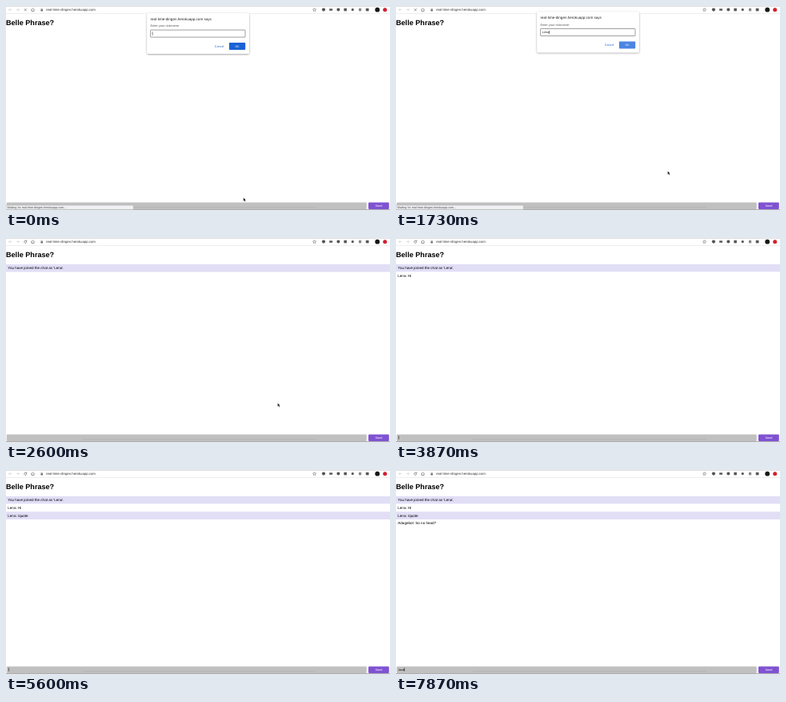
Write an HTML page that moves like this. It is 480 by 256 pixels and loops after 8000 ms.

```html
<!DOCTYPE html>
<html lang="en">
<head>
<meta charset="utf-8">
<title>Chat</title>
<style>
html, body { margin: 0; width: 100%; height: 100%; overflow: hidden; background: #fff; }
svg { display: block; width: 480px; height: 256px; }
text { font: 4.55px "Liberation Sans", Arial, sans-serif; text-rendering: geometricPrecision; white-space: pre; }
.line { fill: none; stroke: #555; stroke-width: .6; }
.idle { stroke: #c4c6c9; }
</style>
</head>
<body>
<svg viewBox="0 0 480 256">
  <defs>
    <filter id="shadow" x="-10%" y="-10%" width="120%" height="130%">
      <feDropShadow dx="0" dy=".8" stdDeviation="1.3" flood-opacity=".4"/>
    </filter>
  </defs>
  <rect width="480" height="256" fill="#fff"/>

  <!-- browser toolbar -->
  <rect width="480" height=".8" fill="#d5d7db"/>
  <rect y="9" width="480" height=".5" fill="#dcdde0"/>
  <path class="line idle" d="M7 4.7H3.6m1.5-1.5-1.5 1.5 1.5 1.5M13 4.7h3.4m-1.5-1.5 1.5 1.5-1.5 1.5"/>
  <path class="line" id="stop" d="m22.9 3.3 2.8 2.8m0-2.8-2.8 2.8"/>
  <path class="line" id="reload" d="M25.6 3.7a1.6 1.6 0 1 0 .3 1.5m0-2.3v1.3h-1.3"/>
  <path class="line" d="m31.4 4.8 2.1-1.9 2.1 1.9m-3.6-.4v2.2h3v-2.2"/>
  <path d="M43.5 4.4h2.4v2h-2.4z" fill="#555"/>
  <path class="line" style="stroke-width:.4" d="M44 4.4v-.8a.7.7 0 0 1 1.4 0v.8"/>
  <text x="50" y="6.2" style="font-size:4.31px" fill="#333">real-time-dingen.herokuapp.com</text>
  <path class="line" style="stroke-width:.45" d="m385.6 2.6.6 1.4 1.5.1-1.2 1 .4 1.5-1.3-.8-1.3.8.4-1.5-1.2-1 1.5-.1z"/>
  <g fill="#555">
    <circle cx="397" cy="4.6" r="2.1"/>
    <rect x="404.2" y="3.4" width="3.9" height="2.4"/>
    <circle cx="415.4" cy="4.6" r="2"/>
    <rect x="422.4" y="2.9" width="3.5" height="3.5"/>
    <circle cx="433.3" cy="4.6" r="1.6"/>
    <rect x="441" y="3" width="3.2" height="3.4" fill="#888"/>
    <rect x="449.8" y="3" width="3.7" height="3.4"/>
  </g>
  <circle cx="464.2" cy="4.7" r="2.9" fill="#171914"/>
  <circle cx="473.7" cy="4.7" r="2.5" fill="#d3202f"/>

  <!-- page -->
  <text x="0" y="24.4" style="font-size:9.1px;font-weight:bold">Belle Phrase?</text>
  <g id="chat"></g>
  <rect x=".8" y="246.4" width="449.9" height="8.6" rx="1" fill="#c0c0c0"/>
  <rect x="453" y="246.4" width="25.8" height="8.6" rx="1.2" fill="#8052d2"/>
  <text x="465.9" y="251.9" style="font-size:3.79px" fill="#fff" text-anchor="middle">Send</text>
  <rect x="96" y="252.3" width="292" height=".8" fill="#aaa" opacity=".6"/>
  <rect y="255.2" width="480" height=".8" fill="#999"/>
  <text id="entry" x="3" y="251.8" style="font-size:3.79px"></text>
  <rect id="entryCaret" y="248.2" width=".5" height="4.4"/>
  <g id="status">
    <path d="M0 250.1h158.3q1 0 1 1v4.3H0z" fill="#f0f1f3" stroke="#a9abae" stroke-width=".5"/>
    <text x="1.4" y="254" style="font-size:3.65px" fill="#444">Waiting for real-time-dingen.herokuapp.com...</text>
  </g>

  <!-- prompt -->
  <g id="dialog">
    <rect x="176.2" y="8.9" width="127.8" height="51" rx="1.8" fill="#fff" filter="url(#shadow)"/>
    <text x="180.5" y="18.1" style="font-size:4.57px" fill="#222">real-time-dingen.herokuapp.com says</text>
    <text x="180.5" y="26.3" style="font-size:3.86px" fill="#555">Enter your nickname:</text>
    <rect x="180.6" y="30.1" width="118.4" height="9" rx=".5" fill="#fff" stroke="#777" stroke-width=".7"/>
    <text id="nick" x="182.8" y="35.9" style="font-size:3.75px" fill="#222"></text>
    <rect id="nickCaret" y="32.4" width=".5" height="4.4"/>
    <text x="266.6" y="51.8" style="font-size:3.7px" fill="#1a66d2" text-anchor="middle">Cancel</text>
    <rect id="ok" x="278.9" y="46" width="20.3" height="9" rx="1"/>
    <text x="289" y="51.8" style="font-size:3.5px" fill="#fff" text-anchor="middle">OK</text>
  </g>

  <path id="pointer" d="M0 0v4.3l1-.9.7 1.6.8-.3-.7-1.6h1.3z" stroke="#fff" stroke-width=".25"/>
</svg>
<script>
const LOOP = 8000;
const $ = id => document.getElementById(id);
const clamp = v => Math.min(1, Math.max(0, v));
const show = (el, on) => el.style.display = on ? '' : 'none';

// '|' marks a visible caret
const nickSteps = [
  [0, '|'], [270, ''], [735, '|'],
  [1200, 'L|'], [1330, 'Le|'], [1530, 'Len|'], [1600, 'Lena|']
];
const entrySteps = [
  [0, ''], [2200, '|'], [2600, ''], [3070, '|'], [3530, 'H|'], [3670, 'Hi|'],
  [3870, '|'], [4330, ''], [4470, '/|'], [4670, '/q|'], [4800, '/qu|'],
  [5000, '/quo|'], [5130, '/quot|'], [5270, '/quote|'],
  [5600, '|'], [6070, ''], [6530, '|'], [7070, ''],
  [7470, '/|'], [7600, '/r|'], [7730, '/re|'], [7870, '/real|']
];
const messages = [
  [2070, "You have joined the chat as 'Lena'."],
  [3870, 'Lena: Hi'],
  [5600, 'Lena: /quote'],
  [6330, 'Adagebot: So no head?']
];

const ROW = 9.7;
$('chat').innerHTML = messages.map(([, text], i) => {
  const y = 32.9 + i * ROW;
  return `<g><rect y="${y}" width="480" height="${ROW}" fill="${i % 2 ? '#fff' : '#e1def6'}"/>
    <text x="2.3" y="${y + 6.4}">${text}</text></g>`;
}).join('');
const rows = [...$('chat').children];

function typeInto(id, steps, t) {
  const field = $(id), caret = $(id + 'Caret');
  const value = steps.filter(s => s[0] <= t).pop()[1];
  const text = value.replace('|', '');
  if (field.textContent !== text) field.textContent = text;
  caret.setAttribute('x', +field.getAttribute('x') + (text ? field.getComputedTextLength() : 0));
  show(caret, value.endsWith('|'));
}

function render(t) {
  const closing = t >= 1730;
  show($('dialog'), t < 1870);
  $('dialog').setAttribute('transform', `translate(0 ${closing ? -1.6 : 0})`);
  $('ok').setAttribute('fill', closing ? '#4b84e3' : '#1a62d6');
  if (t < 1870) typeInto('nick', nickSteps, t);
  typeInto('entry', entrySteps, t);

  rows.forEach((row, i) => show(row, t >= messages[i][0]));
  $('status').style.opacity = 1 - clamp((t - 2200) / 200);
  show($('stop'), t < 2200);
  show($('reload'), t >= 2200);

  const p = clamp(Math.floor((t - 533) / 66.7) / 5);
  const e = p * p * (3 - 2 * p);
  $('pointer').setAttribute('transform', `translate(${296.8 + 42.8 * e} ${240.6 - 33.4 * e})`);
  show($('pointer'), t < 3530);
}

const start = performance.now();
(function frame() {
  render((performance.now() - start) % LOOP);
  requestAnimationFrame(frame);
})();
</script>
</body>
</html>
```
